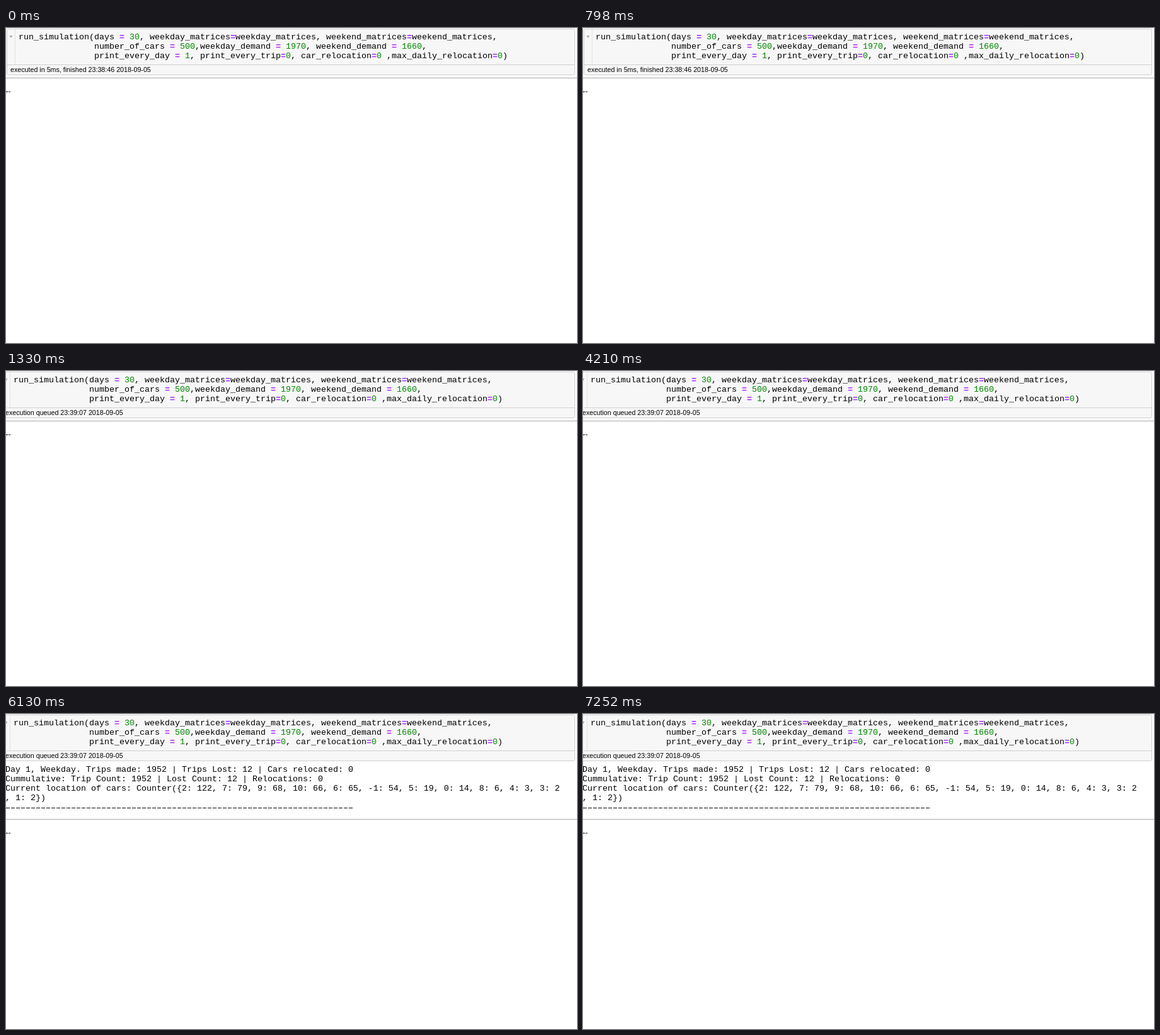
Animation, 906 px wide and 501 px high, one loop 8000 ms. Source, as an HTML page:

```html
<!DOCTYPE html>
<html lang="en">
<head>
<meta charset="utf-8">
<title>Simulation notebook</title>
<style>
html, body { margin: 0; width: 100%; height: 100%; overflow: hidden; background: #fff; }
svg { display: block; }
text { white-space: pre; font: 13.333px "Liberation Mono", "Courier New", monospace; }
.status { font: 10.7px "Liberation Sans", Arial, sans-serif; }
.num { fill: #080; }
.op { fill: #a2f; font-weight: bold; }
.edge { fill: none; stroke: #cfcfcf; }
.gutter { stroke: #e2e2e2; }
.rule { stroke: #a9a9a9; }
.dash { stroke: #000; }
</style>
</head>
<body>
<svg width="906" height="501" viewBox="0 0 906 501">
  <g id="cell">
    <path id="panel" fill="#f7f7f7" stroke="#cfcfcf"/>
    <path class="gutter" d="M14.5 2V58"/>
    <path fill="#aaa" d="M5.5 12h5l-2.5 4z"/>
    <g id="code"></g>
    <text id="status" class="status" x="7" y="70"></text>
  </g>
  <path class="edge" d="M1.5 58.5H902"/>
  <g id="output"></g>
  <g id="tail">
    <path class="rule" d="M0 79.5H906"/>
    <path class="dash" d="M0 101.5H3M4 101.5H7"/>
  </g>
</svg>
<script>
const LOOP = 8000, QUEUED = 1330, PRINTED = 6130;
const $ = id => document.getElementById(id);

const code = [
  "run_simulation(days = 30, weekday_matrices=weekday_matrices, weekend_matrices=weekend_matrices,",
  "number_of_cars = 500,weekday_demand = 1970, weekend_demand = 1660,",
  "print_every_day = 1, print_every_trip=0, car_relocation=0 ,max_daily_relocation=0)"
];
const output = [
  "Day 1, Weekday. Trips made: 1952 | Trips Lost: 12 | Cars relocated: 0",
  "Cummulative: Trip Count: 1952 | Lost Count: 12 | Relocations: 0",
  "Current location of cars: Counter({2: 122, 7: 79, 9: 68, 10: 66, 6: 65, -1: 54, 5: 19, 0: 14, 8: 6, 4: 3, 3: 2",
  ", 1: 2})"
];

const line = (x, y, s) => `<text x="${x}" y="${y}">${s}</text>`;
const paint = s => s.replace(/\d+|=/g, m =>
  `<tspan class="${m === "=" ? "op" : "num"}">${m}</tspan>`);

$("code").innerHTML = code.map((s, i) =>
  line(i ? 140 : 20, 18 + 15 * i, paint(s))).join("");
$("output").innerHTML = output.map((s, i) => line(-1, 92 + 15 * i, s)).join("") +
  '<path class="dash" stroke-dasharray="6 2" d="M0 149.5H551"/>';

function frame(now) {
  const t = now % LOOP;
  const shift = t < QUEUED ? 0 : 8;
  const printed = t >= PRINTED;
  $("cell").setAttribute("transform", `translate(${-shift})`);
  $("panel").setAttribute("d", `M3.5 1.5H${900.5 + shift}q2 0 2 2V72.5q0 2 -2 2H3.5q-2 0 -2 -2V3.5q0 -2 2 -2z`);
  $("status").textContent = shift
    ? "execution queued 23:39:07 2018-09-05"
    : "executed in 5ms, finished 23:38:46 2018-09-05";
  $("output").style.display = printed ? "" : "none";
  $("tail").setAttribute("transform", `translate(0 ${printed ? 88 : 0})`);
}

const start = performance.now();
function tick() {
  frame(performance.now() - start);
  requestAnimationFrame(tick);
}
tick();
</script>
</body>
</html>
```
